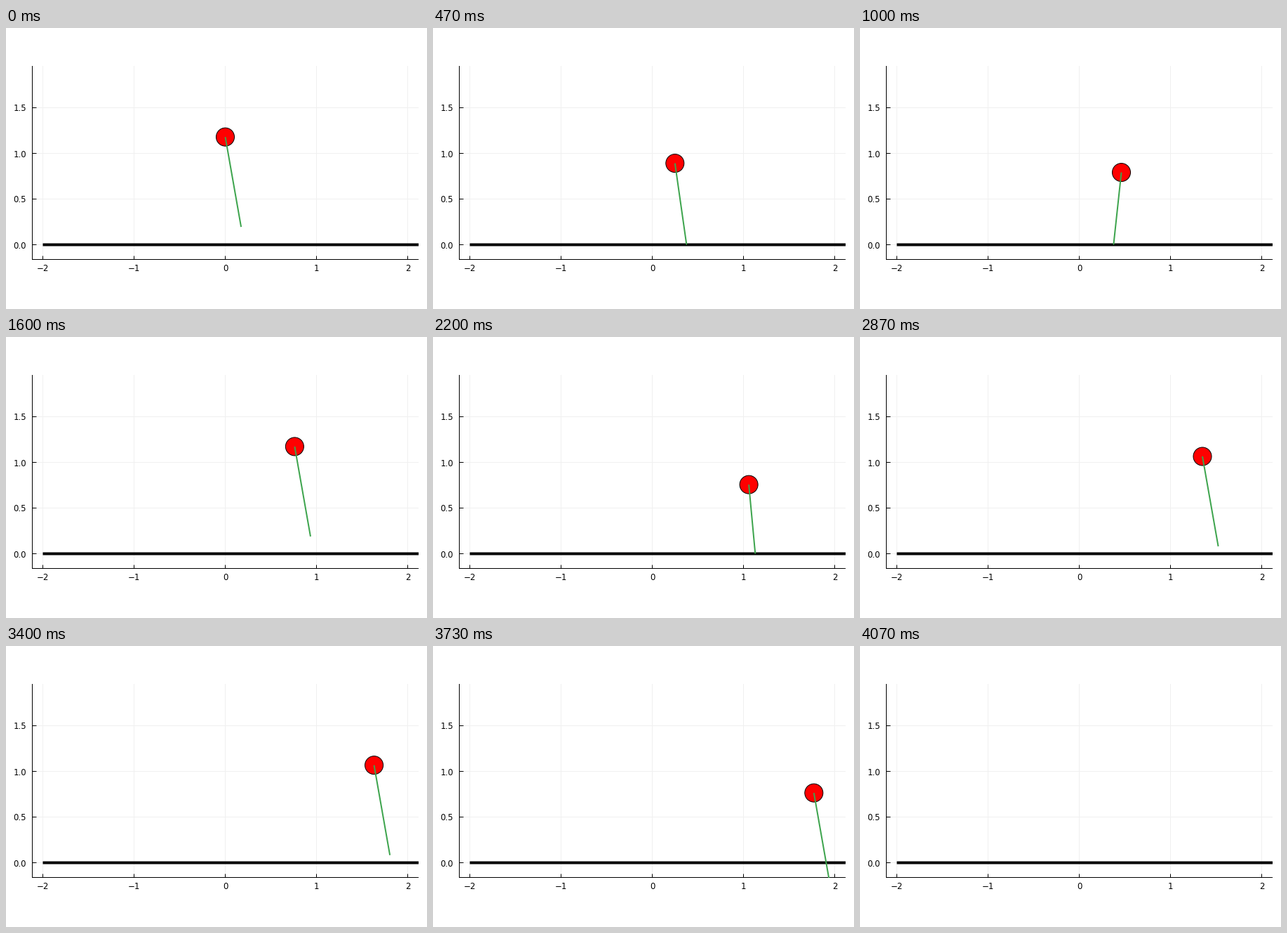
A matplotlib script that plays this animation: 600 by 400 pixels, repeating every 8000 ms.

```python
import numpy as np
import matplotlib.pyplot as plt
from matplotlib.animation import FuncAnimation
from matplotlib.patches import Circle, Rectangle

W, H, DPI = 600, 400, 100
PX = 72 / DPI                      # one pixel in points
SCALE, X0, Y0 = 130, 312.5, 308.5  # world units to pixels
LEFT, RIGHT, TOP, BOTTOM = 37.5, 588, 54, 329.5
FRAMES, LOOP_MS = 120, 8000

# (touchdown, liftoff, foot x) of each stance; the last contact is missed
STANCES = [(-17.6, -5.74, -.376), (5.74, 17.6, .376),
           (29.9, 41.65, 1.129), (52.4, 52.4, 1.854)]
SWING = np.radians(10)
REACH, HIP = np.sin(SWING), np.cos(SWING)
RISE, LOSS = .195, .97             # first hop height, share kept per hop
DIP = .324                         # spring compression
ARC = 2.04                         # half the spring's phase in a stance


def stance(q, foot):
    """Mass on the spring, q from -1 at touchdown to 1 at liftoff."""
    squat = (np.cos(ARC * q) - np.cos(ARC)) / (1 - np.cos(ARC))
    return foot + REACH * (.82 * q + .18 * q ** 3), HIP - DIP * squat


def pose(n):
    """Mass and foot positions at step n."""
    hop = max(i for i, s in enumerate(STANCES[:-1]) if s[1] <= n)
    _, lift, behind = STANCES[hop]
    down, up, ahead = STANCES[hop + 1]
    if down <= n < up:
        q = 2 * (n - down) / (up - down) - 1
        return stance(q, ahead), (ahead, 0)
    s = (n - lift) / (down - lift)
    start, end = behind + REACH, ahead - REACH
    x = start + (end - start) * s
    y = HIP + 4 * RISE * LOSS ** hop * s * (1 - s)
    return (x, y), (x + REACH, y - HIP)


def to_px(p):
    return X0 + SCALE * p[0], Y0 - SCALE * p[1]


fig = plt.figure(figsize=(W / DPI, H / DPI), dpi=DPI, facecolor="white")
ax = fig.add_axes([0, 0, 1, 1])
ax.set_xlim(0, W)
ax.set_ylim(H, 0)
ax.axis("off")


def line(xs, ys, width=1, color="black", **kw):
    return ax.plot(xs, ys, color=color, lw=width * PX, snap=False,
                   solid_capstyle="butt", **kw)[0]


def label(x, y, text, ha):
    ax.text(x, y, text, ha=ha, va="center_baseline", fontsize=8.5,
            family="DejaVu Sans")


for v in range(-2, 3):
    x = X0 + SCALE * v
    line([x, x], [TOP, BOTTOM], color="#f0f0f0", zorder=1)
    line([x, x], [BOTTOM, BOTTOM - 5], zorder=2)
    label(x, 341, str(v).replace("-", "\u2212"), "center")
for v in (0, .5, 1, 1.5):
    y = Y0 - SCALE * v
    line([LEFT, RIGHT], [y, y], color="#f0f0f0", zorder=1)
    line([LEFT, LEFT + 6], [y, y], zorder=2)
    label(29, y, f"{v:.1f}", "right")
line([LEFT, LEFT], [TOP, BOTTOM + .5], zorder=2)
line([LEFT - .5, RIGHT], [BOTTOM, BOTTOM], zorder=2)
line([X0 - 2 * SCALE, RIGHT], [Y0, Y0], 4, zorder=3)

ball = ax.add_patch(Circle((0, 0), .1 * SCALE, fc="red", ec="black",
                           lw=PX, zorder=4))
leg = line([], [], 2, "#3da44d", zorder=5)
window = Rectangle((LEFT, TOP), RIGHT - LEFT, BOTTOM - TOP,
                   transform=ax.transData)
for part in (ball, leg):
    part.set_clip_path(window)


def update(n):
    mass, foot = pose(n)
    hip, toe = to_px(mass), to_px(foot)
    ball.center = hip
    leg.set_data(*zip(hip, toe))
    for part in (ball, leg):
        part.set_visible(mass[1] > 0)  # gone once it hits the ground
    return ball, leg


anim = FuncAnimation(fig, update, frames=FRAMES, interval=LOOP_MS / FRAMES,
                     repeat=True, repeat_delay=0)
plt.show()
```
